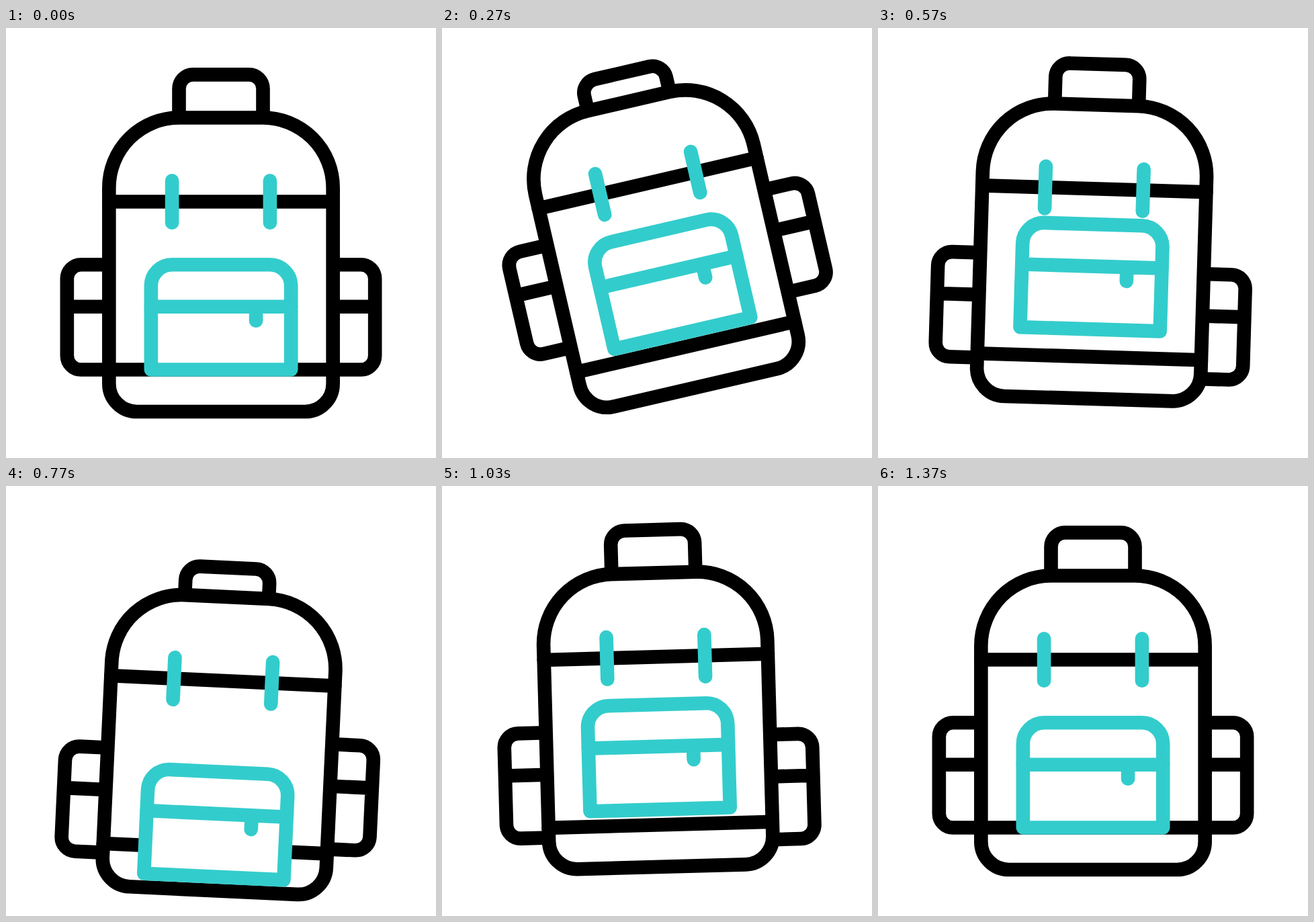
An HTML page that plays this animation: 640 by 640 pixels, repeating every 1.67 s.

```html
<!DOCTYPE html>
<html lang="en">
<head>
<meta charset="utf-8">
<title>Backpack</title>
<style>
  html, body { margin: 0; width: 100%; height: 100%; overflow: hidden; background: #fff; }
  svg { display: block; width: 100vw; height: 100vh; }
</style>
</head>
<body>
<!-- One unit is the width of a line; the bag turns around the middle of the stage. -->
<svg viewBox="-15.36 -15.36 30.72 30.72" fill="none" stroke="#000" stroke-width=".99" stroke-linecap="round" stroke-linejoin="round">
  <g id="bag">
    <g transform="translate(0 .05)">
      <path id="handle" d="M-3-9v-2.08a1 1 0 0 1 1-1h4a1 1 0 0 1 1 1V-9"/>
      <g id="left"><path id="side" d="M-8 1.5h-2a1 1 0 0 0-1 1V8a1 1 0 0 0 1 1h2M-11 4.5h3"/></g>
      <g id="right"><use href="#side" transform="scale(-1 1)"/></g>
      <path fill="#fff" d="M-3-9H3a5 5 0 0 1 5 5V10a2 2 0 0 1-2 2H-6a2 2 0 0 1-2-2V-4a5 5 0 0 1 5-5z"/>
      <path d="M-8-3H8M-8 9H8"/>
      <g stroke="#3cc">
        <path d="M-3.5-4.5v3M3.5-4.5v3"/>
        <g id="pocket">
          <path fill="#fff" d="M-5 9V3a1.5 1.5 0 0 1 1.5-1.5h7A1.5 1.5 0 0 1 5 3V9z"/>
          <path d="M-5 4.5H5M2.5 4.5v1"/>
        </g>
      </g>
    </g>
  </g>
</svg>
<script>
  const LOOP = 1670;
  const STEPS_PER_MS = 0.03;
  const [bag, handle, left, right, pocket] =
    ['bag', 'handle', 'left', 'right', 'pocket'].map(id => document.getElementById(id));

  const ease = t => t ** 1.75 / (t ** 1.75 + (1 - t) ** 1.75);

  // Swings from rest through each peak in turn and back to rest, one beat per swing.
  function swing(step, peaks, beats) {
    let from = 0;
    for (const [i, beat] of beats.entries()) {
      const to = peaks[i] ?? 0;
      if (step < beat) return from + (to - from) * ease(Math.max(0, step) / beat);
      step -= beat;
      from = to;
    }
    return 0;
  }

  const bounce = step => swing(step, [-2.8, 2.18, -1.86, 1.46], [12, 7, 7, 6, 6]);
  const tilt = step => swing(step, [-15.4, 6.8, -4.2], [11, 9, 7, 7]);
  const sink = step => step < 30 ? Math.sin(Math.PI * step / 15) ** 2 : 0;

  const place = (part, y, angle = 0) =>
    part.setAttribute('transform', `translate(0 ${y}) rotate(${angle})`);

  function draw() {
    const step = Math.floor((performance.now() % LOOP + 4) * STEPS_PER_MS);
    // The same bounce runs through the parts, one step later in each.
    place(right, bounce(step));
    place(left, bounce(step - 1));
    place(bag, bounce(step - 2), tilt(step));
    place(pocket, bounce(step - 3));
    place(handle, sink(step));
    requestAnimationFrame(draw);
  }
  draw();
</script>
</body>
</html>
```
